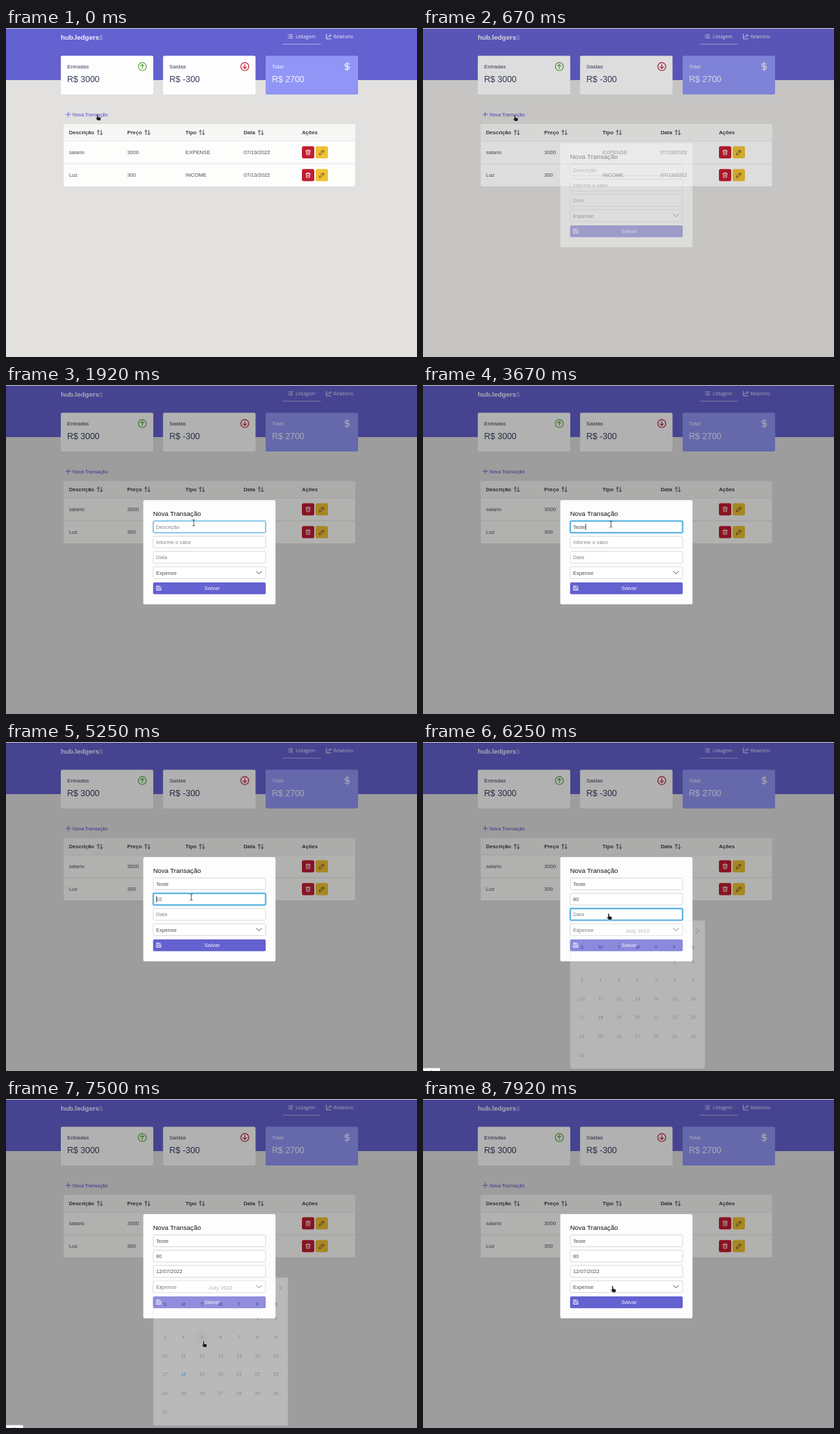
Recreate the animation shown at these times as an HTML page. Size 600x480 px, loop 8 s.

```html
<!DOCTYPE html>
<html lang="pt">
<head>
<meta charset="utf-8">
<title>Finanças</title>
<style>
  html, body { margin: 0; width: 600px; height: 480px; overflow: hidden; background: #e2e1e0; }
  svg { display: block; font: 7.7px "Liberation Sans", Arial, sans-serif; }
  .ui { font-family: "Open Sans", "Noto Sans", sans-serif; }
  .line { fill: none; stroke-linecap: round; stroke-linejoin: round; }
</style>
</head>
<body>
<svg id="stage" width="600" height="480" viewBox="0 0 600 480"></svg>
<script>
const stage = document.getElementById('stage');

const text = (x, y, s, fill, attrs = '') => `<text x="${x}" y="${y}" fill="${fill}" ${attrs}>${s}</text>`;
const box = (x, y, w, h, fill, r = 0, attrs = '') =>
  `<rect x="${x}" y="${y}" width="${w}" height="${h}" rx="${r}" fill="${fill}" ${attrs}/>`;
const icon = (x, y, d, color, width = 1, scale = 1) =>
  `<path class="line" transform="translate(${x} ${y}) scale(${scale})" d="${d}" stroke="${color}" stroke-width="${width / scale}"/>`;

// Icons on a 24-unit grid
const ICON = {
  list: 'M9 5h12M9 12h12M9 19h12M3 5h1M3 12h1M3 19h1',
  chart: 'M2 2v20h20M6 15l5-5 4 3 6-8M17 5h4v4',
  up: 'M12 18V6M7 11l5-5 5 5',
  down: 'M12 6v12M7 13l5 5 5-5',
  dollar: 'M12 1v22M17 5H9.5a3.5 3.5 0 0 0 0 7h5a3.5 3.5 0 0 1 0 7H6',
  sort: 'M6 21V3M1 8l5-5 5 5M18 3v18M13 16l5 5 5-5',
  trash: 'M3 6h18M8 6V3h8v3M5 6l1 15h12l1-15M10 11v5M14 11v5',
  pencil: 'M3 21l1-6L16 3l5 5L9 20zM13 6l5 5',
  save: 'M3 3h14l4 4v14H3zM7 21v-8h10v8M7 3v5h8',
};

function card(x, label, value, fill, ink, mark) {
  return box(x, 40.5, 135, 56.5, fill, 2) + text(x + 9.3, 59, label, ink, 'font-size="7.9"') +
    text(x + 9.3, 79, value, ink, 'font-size="12.5"') + mark;
}

function circled(x, d, color) {
  return `<circle cx="${x}" cy="56.2" r="5.8" fill="none" stroke="${color}" stroke-width="1.2"/>` +
    icon(x - 6, 50.2, d, color, 1.2, 0.5);
}

function row(y, cells) {
  return cells.map((s, i) => text(92 + 85 * i, y + 2.8, s, '#505050')).join('') +
    box(432, y - 8.8, 18, 17.6, '#c11d30', 2.5) + box(452, y - 8.8, 18, 17.6, '#efc132', 2.5) +
    icon(436.5, y - 4.5, ICON.trash, '#fff', 0.8, 0.38) + icon(456.5, y - 4.6, ICON.pencil, '#3c3520', 0.8, 0.38);
}

function page() {
  const head = ['Descrição', 'Preço', 'Tipo', 'Data'], iconX = [132.5, 202, 281.5, 367.5];
  return box(0, 0, 600, 480, '#e2e1e0') + box(0, 0, 600, 76, '#6461d0') +
    text(80, 16.5, 'hub.ledgers<tspan fill="#aaa9ee" font-weight="400">$</tspan>', '#f4f3ff', 'font-size="9.9" font-weight="700"') +
    icon(411, 8.2, ICON.list, '#eeeeff', 0.9, 0.34) + text(423, 15.2, 'Listagem', '#eeeeff', 'class="ui" font-size="6.9"') +
    icon(467, 8.4, ICON.chart, '#eeeeff', 0.9, 0.34) + text(478, 15.2, 'Relatorio', '#eeeeff', 'class="ui" font-size="6.9"') +
    box(404, 23.2, 55.5, 0.9, '#b9b8ee') +
    card(80, 'Entradas', 'R$ 3000', '#fdfdfd', '#363f5f', circled(199, ICON.up, '#58a83e')) +
    card(229.3, 'Saidas', 'R$ -300', '#fdfdfd', '#363f5f', circled(348.6, ICON.down, '#bd2035')) +
    card(379, 'Total', 'R$ 2700', '#9196f6', '#f4f4ff', icon(491.5, 49.5, ICON.dollar, '#fff', 1.1, 0.55)) +
    icon(87.5, 122.5, 'M3.4 0v7M0 3.5h7', '#6461d0', 0.9) +
    text(97, 128.6, 'Nova Transação', '#6461d0', 'class="ui" font-size="6.75" font-weight="600"') +
    box(84.3, 140, 425.2, 91.7, '#fdfdfc', 1) + box(84.3, 140, 425.2, 25, '#f6f6f5', 1) +
    box(84.3, 164.5, 425.2, 0.8, '#e5e5e5') + box(84.3, 197.6, 425.2, 0.9, '#dfdfde') +
    box(84.3, 231, 425.2, 0.8, '#dadad8') +
    head.map((s, i) => text(92 + 85 * i, 155, s, '#3d3d42', 'font-weight="700"') +
      icon(iconX[i], 148, ICON.sort, '#3d3d42', 0.9, 0.37)).join('') +
    text(432, 154.6, 'Ações', '#3d3d42', 'font-weight="700"') +
    row(181.4, ['salario', '3000', 'EXPENSE', '07/19/2022']) +
    row(214.6, ['Luz', '300', 'INCOME', '07/13/2022']);
}

const fieldY = i => 198.4 + 22.25 * i;

function modal() {
  let s = box(200.4, 168, 193, 152, '#fdfdfd', 2) + text(214.7, 191.2, 'Nova Transação', '#111', 'font-size="9.6"');
  for (let i = 0; i < 4; i++) {
    s += box(215, fieldY(i), 164, 17.2, '#fff', 1.8, 'stroke="#cfcfd4" stroke-width=".8"') +
      `<text id="field${i}" x="219" y="${fieldY(i) + 11.4}"></text>`;
  }
  return s + icon(365.5, 271.8, 'M0 0l3.8 3.8L7.6 0', '#333', 0.9) +
    box(214.7, 288, 164.5, 17.2, '#6461d0', 2) + icon(219, 292.3, ICON.save, '#fff', 0.8, 0.34) +
    text(300.8, 299.3, 'Salvar', '#f4f4ff', 'font-size="8" text-anchor="middle"') +
    '<g id="ring" fill="none"><rect id="glow" width="164" height="17.2" x="215" rx="1.8" stroke="#9fd6f0" stroke-opacity=".55"/>' +
    '<rect id="edge" width="164" height="17.2" x="215" rx="1.8" stroke="#45a9dd"/></g>' +
    '<rect id="caret" width=".8" height="9" fill="#222"/>';
}

const dayX = c => 232 + 27.05 * c;
const dayY = r => 320.8 + 27.05 * r;

function calendar() {
  const center = 'text-anchor="middle" font-size="7"';
  let s = box(214, 261.5, 198.5, 216, '#000', 2, 'opacity=".1"') +
    box(215, 260.6, 196.6, 216, '#fefefe', 2, 'stroke="#d8d8d8" stroke-width=".6"') +
    '<circle id="hover" r="9.7" fill="#f0f0f0"/>' +
    icon(224.5, 272.2, 'M3.6 0L0 3.6l3.6 3.6', '#333', 0.9) + icon(398.8, 272.2, 'M0 0l3.6 3.6L0 7.2', '#333', 0.9) +
    text(313, 278.3, 'July 2022', '#444', 'text-anchor="middle" font-weight="700" font-size="7.8"');
  [...'SMTWTFS'].forEach((d, c) => s += text(dayX(c), 302, d, '#555', center + ' font-weight="700"'));
  for (let d = 1; d <= 31; d++) {
    const cell = d + 4, today = d === 18;
    s += text(dayX(cell % 7), dayY(Math.floor(cell / 7)) + 2.5, d, today ? '#228be6' : '#5c5c60',
      center + (today ? ' font-weight="700"' : ''));
  }
  return s;
}

const pointers = {
  hand: '<path d="M-1 1a1 1 0 0 1 2 0v3l3 .8q1.2.4 1 1.8l-.6 3H0l-2.6-3.4q-.4-1.2.8-.9L-1 6.1z" fill="#1b1b1b" stroke="#fff" stroke-width=".5"/>',
  beam: icon(0, 0, 'M-1.6-4.5q1.6 0 1.6.9q0-.9 1.6-.9M0-3.6v7.2M-1.6 4.5q1.6 0 1.6-.9q0 .9 1.6.9', '#333', 0.8),
  arrow: '<path d="M0 0v9l2.1-2 1.4 3.2 1.4-.6-1.4-3.1h3z" fill="#1b1b1b" stroke="#fff" stroke-width=".5"/>',
};

stage.innerHTML = page() + '<rect id="shade" width="600" height="480"/>' +
  `<g id="modal">${modal()}</g><g id="calendar">${calendar()}</g>` +
  `<g id="status">${box(0, 475.8, 25, 5, '#fafafa', 1)}${text(0, 482.5, 'localhos', '#333', 'font-size="6"')}</g>` +
  box(0, 0, 600, 1, '#d3d1cd') +
  Object.entries(pointers).map(([k, s]) => `<g id="${k}">${s}</g>`).join('');

const el = id => document.getElementById(id);
const set = (id, attrs) => Object.entries(attrs).forEach(([k, v]) => el(id).setAttribute(k, v));
const show = (id, on) => el(id).setAttribute('display', on ? 'inline' : 'none');
const ramp = (t, a, b) => Math.min(1, Math.max(0, (t - a) / (b - a)));
const smooth = u => u * u * (3 - 2 * u);
const latest = (t, steps) => steps.filter(s => t >= s[0]).pop();

// time, x, y
const path = [
  [0, 133.5, 125.5], [80, 134, 126.5], [1130, 134, 126.5], [1670, 274, 201], [3600, 274.5, 202.3],
  [4350, 270.5, 226.4], [5600, 270.5, 226.4], [6000, 271, 250], [6300, 271, 250], [6900, 293.5, 367],
  [7380, 291, 370], [7830, 276.8, 273], [7920, 276.8, 272.6], [8000, 276.8, 272.6],
];

function pointerAt(t) {
  const i = path.findIndex(p => p[0] > t), [a, x, y] = path[i - 1], [b, x2, y2] = path[i];
  const u = smooth(ramp(t, a, b));
  return [x + (x2 - x) * u, y + (y2 - y) * u];
}

// time, text, caret index (-1 hides the caret)
const typed = [
  [[0, '', -1], [2830, 'T', 1], [3000, 'Te', 2], [3080, 'Tes', 3], [3250, 'Teste', 5]],
  [[0, '', -1], [4670, '1', 1], [4750, '10', 2], [5250, '10', 0], [5330, '0', 0], [5420, '80', 1]],
  [[0, '', -1], [7330, '12/07/2022', -1]],
  [[0, 'Expense', -1]],
];
const hints = ['Descrição', 'Informe o valor', 'Data', ''];
// time, focused field
const focus = [[0, -1], [1920, 0], [4420, 1], [5950, 2], [7400, -1]];

function drawFields(t) {
  const active = latest(t, focus)[1];
  show('ring', active >= 0);
  show('caret', false);
  if (active >= 0) {
    const grow = ramp(t, 2450, 2650);
    set('edge', { y: fieldY(active), 'stroke-width': 0.9 + 0.6 * grow });
    set('glow', { y: fieldY(active), 'stroke-width': 1.6 + 1.6 * grow });
  }
  typed.forEach((steps, i) => {
    const [, value, caret] = latest(t, steps), field = el('field' + i);
    field.textContent = value || hints[i];
    field.setAttribute('fill', value ? '#505050' : '#858589');
    if (i === active && caret >= 0) {
      const x = caret ? field.getSubStringLength(0, caret) : 0;
      show('caret', true);
      set('caret', { x: 219 + x, y: fieldY(i) + 4.2 });
    }
  });
}

function draw(t) {
  const open = ramp(t, 530, 870);
  set('shade', { opacity: 0.3 * open });
  set('modal', { opacity: open });
  drawFields(t);

  const [x, y] = pointerAt(t);
  const shown = ramp(t, 6200, 6400) - ramp(t, 7380, 7550);
  show('calendar', shown > 0);
  set('calendar', { opacity: shown });
  const col = Math.round((x - 232) / 27.05), line = Math.round((y - 320.8) / 27.05);
  show('hover', line >= 0);
  set('hover', { cx: dayX(col), cy: dayY(line) });
  show('status', t >= 6250 && t < 7920);

  const kind = t < 1200 || t >= 5880 ? 'hand' : x > 215 && y > 198 ? 'beam' : 'arrow';
  Object.keys(pointers).forEach(k => show(k, k === kind));
  set(kind, { transform: `translate(${x} ${y})` });
}

const start = performance.now();
function tick() {
  draw((performance.now() - start) % 8000);
  requestAnimationFrame(tick);
}
tick();
</script>
</body>
</html>
```
